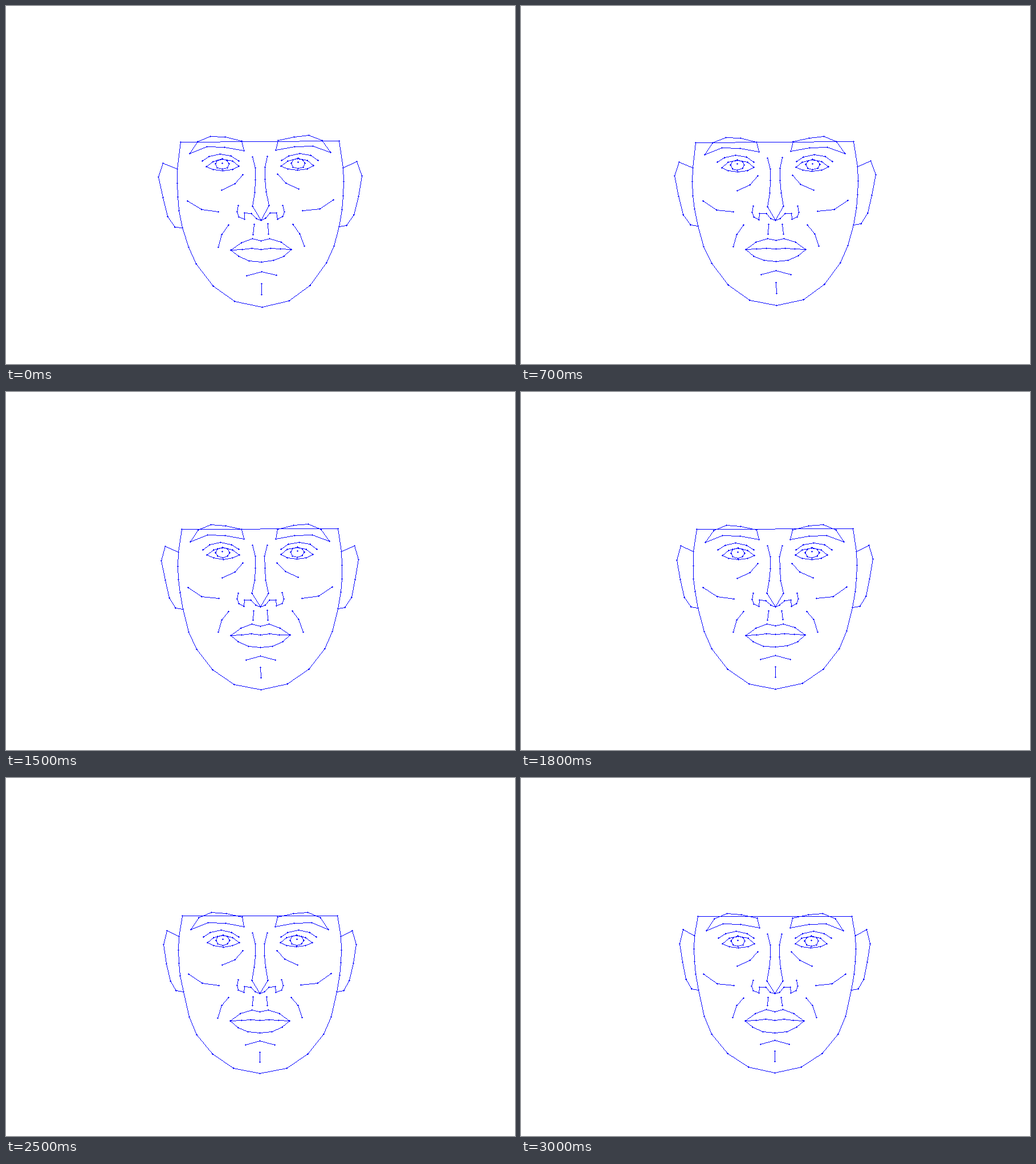
An HTML page with a canvas that plays this animation: 893x627 px, repeating every 3100 ms.

```html
<!DOCTYPE html>
<html lang="en">
<head>
<meta charset="utf-8">
<title>Face outline</title>
<style>
  html, body { margin: 0; width: 100%; height: 100%; overflow: hidden; background: #fff; }
  canvas { display: block; }
</style>
</head>
<body>
<canvas id="stage" width="893" height="627"></canvas>
<script>
const ctx = document.getElementById('stage').getContext('2d');
const LOOP = 3100, STEP = 100, LAST = 29;
const clamp = v => Math.min(1, Math.max(0, v));

// The face is mirrored: a point is [distance from the axis, height].

// The skull is a superellipse; this is its half-width at a height.
const SKULL = { y: 309, rx: 146, ry: 218, power: 2.1 };
function skull(y) {
  const s = Math.min(1, Math.abs(y - SKULL.y) / SKULL.ry);
  return [SKULL.rx * (1 - s ** SKULL.power) ** (1 / SKULL.power), y];
}

// Eight points around an oval; pinch > 1 narrows it to an almond.
function oval(cx, cy, rx, up, down, pinch = 1) {
  return Array.from({ length: 8 }, (_, i) => {
    const c = Math.cos(i * Math.PI / 4), s = Math.sin(i * Math.PI / 4);
    return [cx + rx * Math.sign(c) * Math.abs(c) ** pinch, cy - s * (s > 0 ? up : down)];
  });
}
const close = points => [...points, points[0]];

const HAIRLINE = 237.5, EAR_TOP = 284.5, EAR_END = 387.5, EYE = 66.5;
const [templeWidth] = skull(HAIRLINE);
const nose = [0, 375], mouthCorner = [53, 427];

const parts = [
  // head
  [[-templeWidth, HAIRLINE], [templeWidth, HAIRLINE]],
  [HAIRLINE, EAR_TOP, 309, 333.5, 357.5, EAR_END, 421.5, 450.5, 490, 517, 527].map(skull),
  [skull(EAR_TOP), [170, 274], [178.5, 298.5], [171.5, 334.5], [163.5, 367], [150.5, 386], skull(EAR_END)],
  // brow and eye
  close([[123.5, 257.5], [109, 236.5], [86.5, 227.5], [60.5, 229.5],
    [32, 236], [28, 253], [61.5, 247], [93, 246]]),
  oval(69.7, 271, 32, 12, 12, 1.5).slice(0, 5),
  close(oval(65.5, 280.5, 28.5, 12.8, 7.7, 1.5)),
  close(oval(EYE, 276.3, 12.3, 9, 9)),
  [[EYE, 274.5]],
  // cheek
  [[67.5, 321.5], [45, 311], [30.5, 295]],
  [[128, 340.5], [103.5, 356], [74, 359.5]],
  [[56.5, 383], [68.5, 400], [75.5, 421.5]],
  // nose
  [[13, 264], [8.5, 283], [8.5, 304], [10, 326], [14.5, 350], nose],
  [[39, 349.5], [41.5, 360.5], [38.5, 369], [29, 373.5], [28, 362.5], [16.5, 363], [8, 372], nose],
  [[12, 382], [13.5, 400]],
  // mouth and chin
  [mouthCorner, [34.5, 414], [15, 407.5], [0, 411]],
  [mouthCorner, [33.5, 426], [16.5, 424.5], [0, 426]],
  [mouthCorner, [39.5, 438.5], [21.5, 446], [0, 448]],
  [[26, 472], [0, 465]],
  [[0, 486], [0, 505]]
];

// Over the loop the face gets shorter and narrower, its sides and ears
// slide up, and its slight lean straightens.
function place([u, y], side, k) {
  const width = Math.abs(u);
  const level = y > 399 && y < 452 ? 425 : y; // the mouth moves as one
  const squash = 9.5 - 0.09 * Math.max(0, level - 300);
  const slide = -18 * clamp((width - 126) / 12) * clamp((y - 225) / 50);
  const shrink = 0.028 * width + 0.22 * Math.max(0, width - 150);
  const across = side * Math.sign(u) * (width - shrink * k);
  const down = y + (squash + slide) * k;
  return [
    Math.floor(445.6 - 0.3 * k + across + 0.013 * (1 - k) * (y - 260)),
    Math.floor(down - 0.008 * (1 - k) * across)
  ];
}

// One-pixel line without smoothing
function drawLine([x0, y0], [x1, y1]) {
  const n = Math.max(Math.abs(x1 - x0), Math.abs(y1 - y0), 1);
  for (let i = 0; i <= n; i++) {
    ctx.fillRect(Math.round(x0 + (x1 - x0) * i / n), Math.round(y0 + (y1 - y0) * i / n), 1, 1);
  }
}

function drawDot([x, y]) {
  ctx.fillRect(x - 1, y, 3, 1);
  ctx.fillRect(x, y - 1, 1, 3);
}

function draw(now) {
  const k = Math.max(0, Math.floor(now % LOOP / STEP) - 1) / LAST;
  ctx.fillStyle = '#fff';
  ctx.fillRect(0, 0, 893, 627);
  ctx.fillStyle = '#00f';
  for (const side of [-1, 1]) {
    for (const part of parts) {
      const points = part.map(p => place(p, side, k));
      points.forEach((p, i) => {
        if (i) drawLine(points[i - 1], p);
        drawDot(p);
      });
    }
  }
}

function tick() {
  draw(performance.now());
  requestAnimationFrame(tick);
}
tick();
</script>
</body>
</html>
```
